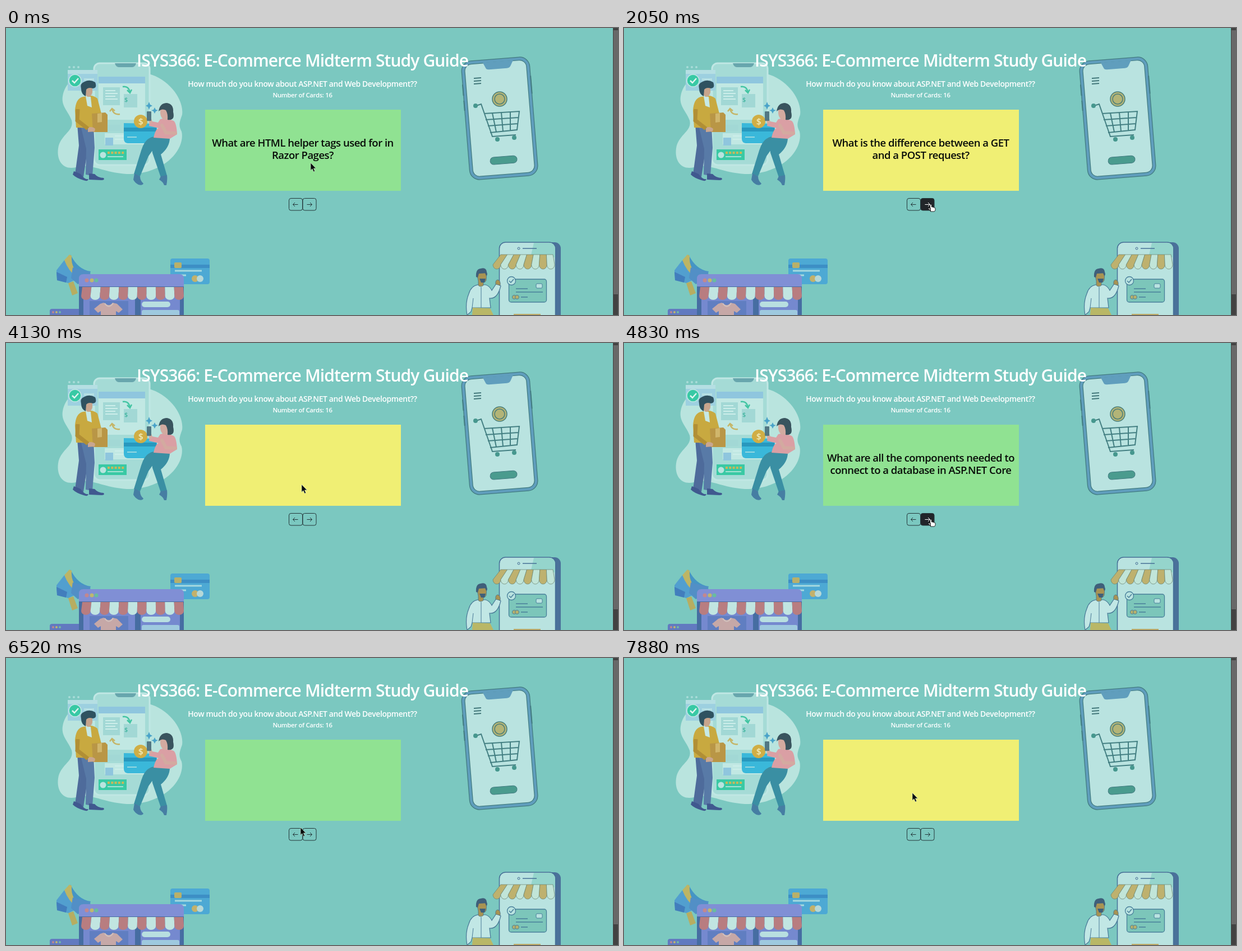
An HTML page that plays this animation: 1091x513 px, repeating every 8000 ms.

```html
<!DOCTYPE html>
<html lang="en">
<head>
<meta charset="utf-8">
<title>Study cards</title>
<style>
html, body { margin: 0; width: 100%; height: 100%; overflow: hidden; background: #7bc8c0; }
svg { position: absolute; left: 0; top: 0; }
text, #words { font-family: "Open Sans", "Noto Sans", sans-serif; font-weight: 600; letter-spacing: -.027em; }
#card { position: absolute; left: 354.5px; top: 145.5px; width: 349px; height: 145px; }
#words { height: 141px; display: flex; align-items: center; justify-content: center;
  text-align: center; white-space: pre; font-size: 18.5px; line-height: 22.2px; color: #080c08; }
</style>
</head>
<body>
<svg width="1091" height="513" viewBox="0 0 1091 513">
  <!-- shoppers -->
  <g>
    <path fill="#b9e4de" d="M101 122C105 98 125 80 160 76L245 80C285 85 318 125 314 155C308 172 308 175 313 185C320 215 285 262 215 261C170 258 150 240 125 249C100 255 90 235 93 215C97 190 122 185 117 165C112 150 98 140 101 122Z"/>
    <rect x="157" y="63" width="99" height="182" rx="10" fill="#a5dbd6" stroke="#c0e7e4" stroke-width="3"/>
    <path fill="#68a6ad" d="M194 63h38q-2 7-7 7h-24q-5 0-7-7z"/>
    <path fill="#8fc6de" d="M165 87h83v12h-83z"/>
    <path fill="#c1e8e3" d="M165 99h83v65h-83zM176 188h70v20h-70z"/>
    <path fill="#a2d8d5" d="M173 106h30v32h-30zM210 118h24v24h-24zM178 173h26v11h-26z"/>
    <path stroke="#cdeeea" stroke-width="2" d="M177 112h18m-18 5h22m-22 5h18m-18 5h22M194 193h30m-30 6h40"/>
    <path fill="#8fc6de" d="M177 196h14v14h-14z"/>
    <g fill="none" stroke-width="2.5">
      <path stroke="#43c5a3" d="M208 105q10-2 13 9m-5-3 5 5 3-6"/>
      <path stroke="#c5b566" d="M203 154q-11 2-14-9m-4 4 4-5 5 4"/>
    </g>
    <text x="211" y="132" font-size="11" fill="#43b5a0">$</text>
    <path fill="#9dd0e0" d="M110 75h53v37h-53z"/>
    <path fill="#b5dfe3" d="M110 75h53v7h-53zM139 90h18v4h-18zm0 8h18v4h-18z"/>
    <g fill="#a9dcd8"><circle cx="113" cy="70" r="2"/><circle cx="121" cy="70" r="2"/><circle cx="129" cy="70" r="2"/></g>
    <circle cx="123" cy="94" r="11" fill="#38c9a5" stroke="#c1e8e3" stroke-width="1.5"/>
    <path fill="none" stroke="#e0f5f0" stroke-width="2.5" d="m118 94 4 4 7-8"/>
    <rect x="165" y="217" width="50" height="19" fill="#39c9a4"/>
    <circle cx="173" cy="227" r="5.5" fill="#b9e4de"/>
    <path stroke="#c8b759" stroke-width="4" stroke-dasharray="4 2.3" d="M181 223h30"/>
    <path stroke="#a4e2d3" stroke-width="2" d="M181 230h28"/>
    <!-- man -->
    <path fill="#4e6b9b" d="M127 172 156 174Q157 190 147 208L138 266 123 262 130 210z"/>
    <path fill="#587aa7" d="M133 174h23l2 40-4 50-12-2 1-46z"/>
    <path fill="#40598f" d="M121 256q6 2 12 5 8 11 14 9-1 5-9 2-13-4-19-10zM148 260l10 1q6 7 16 7 3 4-4 4l-22-1z"/>
    <path fill="#c8a940" d="M137 123Q124 126 123 148L125 178 157 179 156 153Q165 161 170 153L163 126Q154 119 146 122z"/>
    <path fill="#c6e9e5" d="m142 122 9 1 2 19-8-3z"/>
    <path fill="#c7a58d" d="M139 104h15v11q-2 8-8 8-7-3-7-12z"/>
    <path fill="#2f5260" d="M134 109Q131 99 140 96 149 91 159 97 163 107 155 108 147 105 143 110L142 122Q134 118 134 109z"/>
    <path fill="#b99646" d="M153 153 177 151 181 155V186H155z"/>
    <path fill="#d0b66c" d="m163 153 8-1v16l-8 1z"/>
    <path fill="#c9a690" d="M146 178q8-3 13 2l-1 5-12 1z"/>
    <path fill="none" stroke="#b18f35" stroke-width="7" d="m128 145-1 20 19 15"/>
    <!-- woman -->
    <path fill="#3ab8da" d="m210 170 59 1v35h-52q-7-1-7-8z"/>
    <path fill="#2898be" d="M210 178h58v7h-58z"/>
    <path stroke="#97d7df" stroke-width="2" d="M216 195h17"/>
    <circle cx="240" cy="167" r="12" fill="#d0ae45"/>
    <text x="240" y="173" font-size="16" fill="#efeab7" text-anchor="middle">$</text>
    <path fill="#4aa3c9" d="m255 132 2 5 4 2-4 2-2 5-2-5-4-2 4-2zM265 142l2 4 4 1-4 2-2 4-2-4-4-2 4-1z"/>
    <path fill="#3a8fa3" d="M264 194 292 196Q292 213 276 226L287 264 276 267 262 226Q258 216 266 212L254 229 239 265 228 261 241 219Q248 196 264 194z"/>
    <path fill="#467ea3" d="M229 260l10 5q0 8 6 13-2 4-9 2-7-4-9-9zM276 265l11-2q1 9-1 18h-4q-2-6-9-10z"/>
    <path fill="#da9fa4" d="M275 163Q284 160 299 166 304 170 305 190L292 198 263 196Q266 181 272 179l-17-4 1-9 15 3z"/>
    <path fill="none" stroke="#d3aaa0" stroke-width="6" stroke-linecap="round" d="M258 168 255 160M302 188 285 187 278 174"/>
    <path fill="#d2aaa0" d="M275 145h17v14q-4 6-10 5-6-3-7-11z"/>
    <path fill="#39545e" d="M272 149Q274 134 287 134 299 136 298 150 302 166 288 164 289 154 285 147 278 143 272 149z"/>
    <rect x="251" y="149" width="8" height="17" rx="1" fill="#527783"/>
  </g>

  <!-- phone with cart -->
  <g>
    <g transform="rotate(-4.6 880 161)">
      <rect x="822" y="58" width="116" height="207" rx="15" fill="#b9e3e0" stroke="#427b80" stroke-width="7"/>
      <rect x="822" y="58" width="116" height="207" rx="15" fill="none" stroke="#609ebd" stroke-width="4.5"/>
      <path fill="#609ebd" d="M858 60h54l-5 9q-2 4-7 4h-32q-5 0-6-4z"/>
      <path stroke="#427b80" stroke-width="2" d="M819 96v20m0 9v18m122-53v32"/>
      <rect x="857" y="230" width="48" height="13" rx="6.5" fill="#4a9b8e" stroke="#427b80"/>
    </g>
    <path stroke="#42777a" stroke-width="2" d="m834 90 13-1m-13 6 13-1m-13 6 13-1"/>
    <circle cx="880" cy="127" r="13" fill="#b3b477" stroke="#4b7e79" stroke-width="1.5"/>
    <circle cx="880" cy="127" r="9" fill="none" stroke="#4b7e79" stroke-width="1.5"/>
    <g fill="none" stroke="#437f82" stroke-width="2">
      <path d="M838 139 847 136 865 188 867 194 909 191M852 153l63-4-4 33-48 5M855 164l58-4M859 175l53-4M867 152l7 34M883 151l3 34M899 150v33"/>
    </g>
    <g fill="#46978e"><circle cx="837" cy="139" r="4"/><circle cx="876" cy="199" r="4"/><circle cx="906" cy="196" r="4"/></g>
  </g>

  <!-- shop window -->
  <g>
    <path fill="#4595c5" d="M115 405Q111 435 137 445L145 449 151 435Q128 432 115 405z"/>
    <path fill="#bdb565" d="M113 405 104 415Q109 432 128 448L137 445Q115 432 117 407z"/>
    <path fill="#529fcf" d="M104 415 90 433 91 450 111 456 128 448Q111 434 104 415z"/>
    <path fill="#427ebd" d="M90 436 91 451 107 455 109 445z"/>
    <path fill="#b7ad61" d="m111 456 9-3 8 21-10 4z"/>
    <path fill="#528fc6" d="M119 428 150 436 151 445 128 458 116 447z"/>
    <rect x="293" y="412" width="70" height="46" rx="4" fill="#4da9d4"/>
    <path fill="#3d8fc5" d="M293 423h70v6h-70z"/>
    <rect x="300" y="419" width="13" height="10" rx="2" fill="#b8b06a"/>
    <path stroke="#a6d9e0" stroke-width="3" d="M301 434h48M301 442h20M301 448h14"/>
    <circle cx="337" cy="448" r="6" fill="#c3b16b"/><circle cx="346" cy="448" r="6" fill="#b5d8d8"/>
    <path fill="#466da2" d="M130 458h187v55H130z"/>
    <path fill="#7589cf" d="M138 476h92v37h-92zM240 476h70v37h-70z"/>
    <path fill="#607ec1" d="M149 488h69v25h-69z"/>
    <path fill="#808fd5" d="M130 462v-14q0-8 8-8h171q8 0 8 8v14z"/>
    <g><circle cx="144" cy="451" r="3.5" fill="#c2878f"/><circle cx="153" cy="451" r="3.5" fill="#beb770"/><circle cx="161" cy="451" r="3.5" fill="#68bca0"/></g>
    <path fill="#c6a8a7" d="m174 491 7 4q6 1 9-4l8 2 10 10-7 6-5-3v7h-27v-7l-5 3-7-7 11-9z"/>
    <path fill="none" stroke="#d2c2be" stroke-width="2" d="M176 492q7 11 15 0"/>
    <rect x="242" y="489" width="51" height="10" rx="5" fill="#b8dfe0"/>
    <rect x="242" y="504" width="67" height="14" rx="3" fill="#9ec9df"/>
    <path fill="#627ac0" d="M78 513v-7q0-4 4-4h48v11z"/>
    <g><circle cx="84" cy="508" r="2" fill="#bd8790"/><circle cx="90" cy="508" r="2" fill="#bcb571"/><circle cx="96" cy="508" r="2" fill="#6fbba3"/></g>
    <g id="redAwning"></g>
  </g>

  <!-- shop phone -->
  <g>
    <rect x="885" y="383" width="104" height="150" rx="11" fill="#4a719a"/>
    <rect x="879.5" y="383" width="100" height="150" rx="11" fill="#b9e3e0" stroke="#466f96" stroke-width="1.5"/>
    <path fill="#95d5cc" d="M941 384h28q10 1 10 11v15h-44z"/>
    <circle cx="914" cy="394" r="2" fill="none" stroke="#466f96"/>
    <path stroke="#466f96" stroke-width="1.5" d="M921 394h25"/>
    <g id="goldAwning" stroke="#68806c" stroke-width=".7"></g>
    <rect x="896.5" y="449" width="67" height="41" rx="4" fill="#7cc6ba" stroke="#487f9a" stroke-width="1.3"/>
    <rect x="945" y="457" width="11" height="8" rx="2" fill="#b9e3e0" stroke="#487f9a"/>
    <path stroke="#487f9a" stroke-width="1.3" d="M909 466h21m-21 6h48M918 481h12"/>
    <circle cx="906" cy="481" r="3.5" fill="#b7b16c" stroke="#487f9a"/><circle cx="911" cy="481" r="3.5" fill="#b7b16c" stroke="#487f9a"/>
    <circle cx="901" cy="452" r="7.5" fill="#b9e3e0" stroke="#487f9a" stroke-width="1.3"/>
    <path fill="none" stroke="#487f9a" stroke-width="1.5" d="m897 452 3 3 5-6"/>
    <rect x="905" y="511" width="48" height="8" fill="#bca967"/>
    <path fill="#c1e7e5" stroke="#487896" stroke-width="1.2" d="M841 459Q829 461 825 475 818 492 822 513L829 507 831 500 864 500 862 483Q876 485 882 461L874 457 866 469Q862 461 855 459z"/>
    <path fill="#a89353" stroke="#4c7183" stroke-width=".8" d="M873 458q-1-8 4-8 5 2 4 10zM839 438h18l-1 13q-2 4-5 4v5q-5 4-9 0v-8z"/>
    <path fill="#3f5f7a" d="M838 445q-1-14 8-15 10-3 11 6 2 6-1 7l-2-5-11 1-2 7zM844 448h11l-2 7h-6z"/>
    <path fill="#b9b766" d="m832 500 31 1 6 12h-38z"/>
    <path fill="none" stroke="#487896" d="M847 463v37M833 483l-2 17"/>
  </g>

  <g fill="#fff" text-anchor="middle">
    <text x="528.5" y="69" font-size="30" style="letter-spacing:-.03em">ISYS366: E-Commerce Midterm Study Guide</text>
    <text x="528.5" y="105" font-size="13.9">How much do you know about ASP.NET and Web Development??</text>
    <text x="528.5" y="124.3" font-size="11.3">Number of Cards: 16</text>
  </g>
  <path fill="#424242" d="M1082 0h9v513h-9z"/>
  <path fill="#686868" d="M1083 4h8v472h-8z"/>
</svg>

<div id="card"><div id="words"></div></div>

<svg width="1091" height="513" viewBox="0 0 1091 513">
  <g fill="none" stroke="#24373a">
    <rect x="504.5" y="304.5" width="24" height="21.5" rx="3.5"/>
    <path d="M520.5 315.5h-9m3.5-3.5-3.5 3.5 3.5 3.5"/>
    <g id="next">
      <rect x="529" y="304.5" width="24" height="21.5" rx="3.5"/>
      <path d="M536.5 315.5h9m-3.5-3.5 3.5 3.5-3.5 3.5"/>
    </g>
  </g>
  <path id="beam" stroke="#333" stroke-width="1" d="M545.5 235v26"/>
  <path id="arrow" fill="#080c0c" stroke="#dcecd8" stroke-width=".6" d="M0 0V13.5L3 10.7 5.3 16 7.6 15 5.4 9.9H9.6z"/>
  <path id="hand" fill="#fff" stroke="#111" stroke-width=".9" d="M-1.4 6V1Q0-1 1.4 1V5Q3 4 4 5.6 5.5 4.8 6.3 6.3 8 5.8 8 7.8V10Q7.5 12 6.5 13H-.5Q-2-.0-.5 12.5L-4.3 8Q-4.6 6-2.8 6.5L-1.4 8z"/>
</svg>

<script>
const $ = id => document.getElementById(id);

// Striped awning: tapering top, scalloped hem
function awning(id, [x0, x1], [x2, x3], top, hem, drop, n, colors) {
  const a = (x1 - x0) / n, b = (x3 - x2) / n;
  let out = "";
  for (let i = 0; i < n; i++) {
    const l = x2 + b * i;
    out += `<path fill="${colors[i % 2]}" d="M${x0 + a * i} ${top}h${a}L${l + b} ${hem}q0 ${drop} ${-b / 2} ${drop}t${-b / 2} ${-drop}z"/>`
      .replace(/q0 (\S+) (\S+) \S+t\S+ \S+z/, (m, d, h) => `a${-h} ${d} 0 0 1 ${2 * h} 0z`);
  }
  $(id).innerHTML = out;
}
awning("redAwning", [136, 316], [134, 317], 463, 479, 7, 11, ["#b87d80", "#c1e5e1"]);
awning("goldAwning", [882, 975], [868, 978], 405, 423, 8, 8, ["#beb16e", "#c1e5d8"]);

const GREEN = "#90e292", YELLOW = "#f0ef74";
const q1 = "What are HTML helper tags used for in\nRazor Pages?";
const a1 = "HTML helper tags are used to generate\nHTML tags so that the developer only\nhas to change the model and not the\nHTML tags";
const q2 = "What is the difference between a GET\nand a POST request?";
const a2 = "A GET request reads data and shows it\nin the URL, while a POST request sends\ndata in the body so it can be stored\nby the server";
const q3 = "What are all the components needed to\nconnect to a database in ASP.NET Core";
const a3 = "A model class, a DbContext class,\na connection string and a service\nthat is registered in the main\nprogram file";
const q4 = "What is the purpose of a layout page?";

// [time, colour, text, flips]
const views = [
  [0, GREEN, q1], [150, GREEN, a1, 1],
  [1950, YELLOW, q2], [2710, YELLOW, a2, 1], [3990, YELLOW, q2, 1],
  [4720, GREEN, q3], [5260, GREEN, a3, 1], [6390, GREEN, q3, 1],
  [6800, YELLOW, q4], [7750, YELLOW, "", 1]
];

// [time, x, y] of the pointer
const path = [
  [0, 543, 241], [1380, 543, 241], [1500, 544, 262], [1760, 547, 315], [2050, 547, 315],
  [2450, 521, 226], [3140, 521, 226], [3500, 527, 253], [4270, 527, 253], [4640, 547, 315],
  [4980, 547, 315], [5250, 530, 252], [6300, 530, 252], [6520, 525, 303], [6670, 538, 312],
  [6900, 538, 312], [7500, 514, 241], [8000, 514, 241]
];
const swing = [[0, 90], [.4, -20], [.6, 10], [.8, -5], [1, 0]];

function at(keys, t, ease) {
  const i = Math.max(1, keys.findIndex(k => k[0] >= t));
  const a = keys[i - 1], b = keys[i];
  const p = ease((t - a[0]) / (b[0] - a[0]));
  return a.slice(1).map((v, j) => v + (b[j + 1] - v) * p);
}
const smooth = p => p * p * (3 - 2 * p);
const easeIn = p => p ** 1.7;

function drawCard(t) {
  const i = views.findLastIndex(v => v[0] <= t);
  const [start, color, text, flips] = views[i];
  const dt = t - start;
  let shown = text, angle = 0, alpha = 1;
  if (flips && dt < 130) {
    shown = views[i - 1][2];
    angle = dt / 130 * 90;
    alpha = 1 - dt / 130;
  } else if (flips && dt < 270) {
    alpha = 0;
  } else if (flips) {
    const p = Math.min(1, (dt - 270) / 650);
    [angle] = at(swing, p, easeIn);
    alpha = Math.min(1, p / .6);
  }
  const words = $("words");
  if (words.textContent !== shown) words.textContent = shown;
  words.style.transform = angle ? `perspective(400px) rotateY(${angle}deg)` : "none";
  words.style.opacity = alpha;
  $("card").style.background = color;
}

function drawPointer(t) {
  const [x, y] = at(path, t, smooth);
  const over = x > 528.5 && y > 304;
  const [box, arrow] = $("next").children;
  box.setAttribute("fill", over ? "#212529" : "none");
  arrow.setAttribute("stroke", over ? "#fff" : "#24373a");
  for (const id of ["arrow", "hand"]) {
    $(id).setAttribute("transform", `translate(${x} ${y})`);
    $(id).style.display = over === (id === "hand") ? "" : "none";
  }
  $("beam").style.display = t >= 1100 && t < 1500 ? "" : "none";
}

function frame() {
  const t = performance.now() % 8000;
  drawCard(t);
  drawPointer(t);
  requestAnimationFrame(frame);
}
frame();
</script>
</body>
</html>
```
